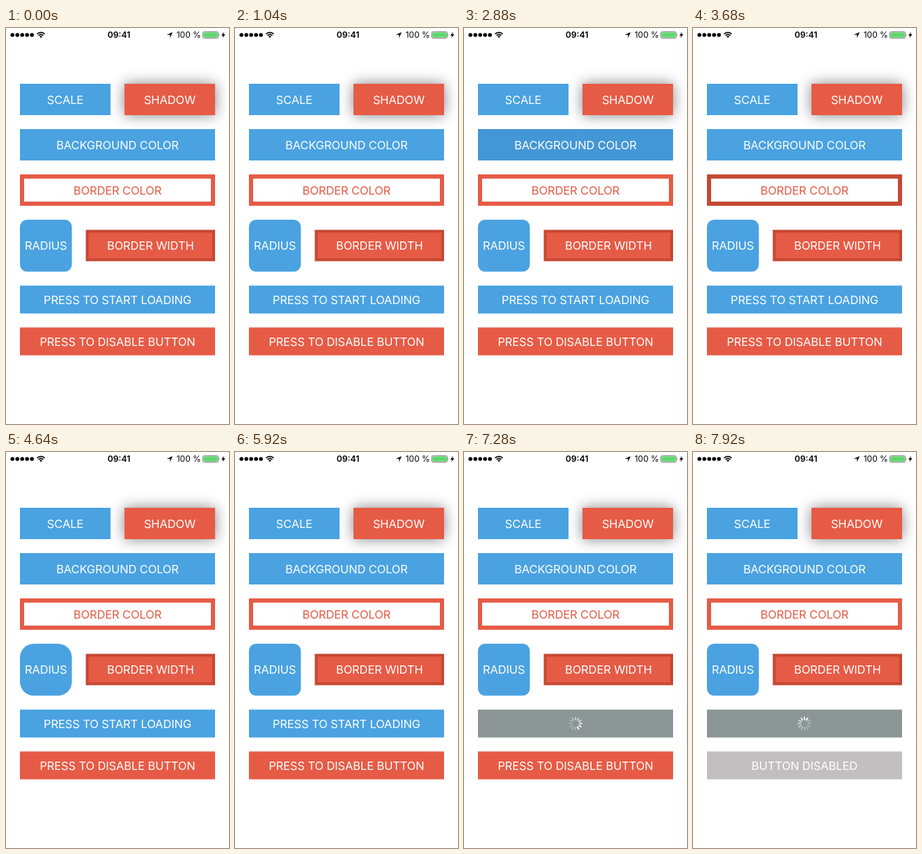
Write an HTML page that moves like this. It is 320 by 568 pixels and loops after 8000 ms.

```html
<!DOCTYPE html>
<html lang="en">
<head>
<meta charset="utf-8">
<title>Button states</title>
<style>
html, body { margin: 0; width: 100%; height: 100%; overflow: hidden; background: #fff; }
svg { display: block; font-family: Inter, "Open Sans", sans-serif; }
.label { font-size: 16.5px; letter-spacing: -.13px; text-anchor: middle; fill: #fff; }
</style>
</head>
<body>
<svg width="320" height="568" font-size="12">
  <path d="M9.2 10h29" stroke="#000" stroke-width="5.6" stroke-linecap="round" stroke-dasharray="0 7"/>
  <g fill="none" stroke="#000" stroke-width="1.7">
    <path d="M44.6 8.6a7.8 7.8 0 0 1 11 0M46.7 10.8a4.8 4.8 0 0 1 6.8 0"/>
  </g>
  <path d="M50.1 14.2l-1.9-1.9a2.7 2.7 0 0 1 3.8 0z"/>
  <text x="162" y="14.3" font-size="12.2" text-anchor="middle" font-weight="600">09:41</text>
  <path d="M239 6l-3.6 8.4v-4.6h-4.7z"/>
  <text x="262.3" y="14.3" text-anchor="middle">100 %</text>
  <rect x="282.5" y="5.5" width="22" height="9" rx="1.8" fill="#fff" stroke="#555" stroke-width=".8"/>
  <rect x="283.5" y="6.5" width="20" height="7" rx=".8" fill="#59d86b"/>
  <path d="M305.7 8.3q1.4 1.7 0 3.4z" fill="#555"/>
  <path d="M313 5.5l-4 5.2h2.5l-1 3.8 4.2-5.4h-2.6z"/>
  <rect id="glow" x="170" y="80" width="130" height="45" fill="#14141e" opacity=".53"/>
  <g id="buttons"></g>
  <g id="spinner" transform="translate(160 389.5)" stroke="#fff" stroke-width="2" stroke-linecap="round"></g>
</svg>
<script>
const LOOP = 8000, SPOKES = 12;
const BLUE = [74, 162, 225], DARK_BLUE = [61, 137, 200];
const RED = [230, 91, 69], DARK_RED = [197, 72, 51];
const GRAY = [139, 149, 150], LIGHT = [193, 195, 198];

const ease = (t, a, b) => {
  const p = Math.min(1, Math.max(0, (t - a) / (b - a)));
  return p * p * (3 - 2 * p);
};
// Rises over a..b, falls over c..d
const press = (t, a, b, c, d) => ease(t, a, b) - ease(t, c, d);
const mix = (a, b, p) => a + (b - a) * p;
const rgb = c => `rgb(${c.map(Math.round)})`;
const blend = (a, b, p) => rgb(a.map((v, i) => mix(v, b[i], p)));

const el = id => document.getElementById(id);
const set = (node, attrs) => {
  for (const key in attrs) node.setAttribute(key, attrs[key]);
};
function add(parent, tag, attrs) {
  const node = document.createElementNS('http://www.w3.org/2000/svg', tag);
  set(node, attrs);
  return parent.appendChild(node);
}

// Drawn around its own centre, so that it can be scaled in place
function button(x, y, w, h, fill, title) {
  const cx = x + w / 2, cy = y + h / 2;
  const group = add(el('buttons'), 'g', {});
  const box = add(group, 'rect', { fill: rgb(fill) });
  const label = add(group, 'text', { class: 'label', y: 6 });
  const self = {
    box, label,
    scale: s => set(group, { transform: `translate(${cx} ${cy}) scale(${s})` }),
    border: b => set(box, {
      x: (b - w) / 2, y: (b - h) / 2, width: w - b, height: h - b, 'stroke-width': b
    }),
    title: text => { if (label.textContent !== text) label.textContent = text; }
  };
  self.scale(1);
  self.border(0);
  self.title(title);
  return self;
}

const scale = button(20, 80, 130, 45, BLUE, 'SCALE');
button(170, 80, 130, 45, RED, 'SHADOW');
const fill = button(20, 145, 280, 45, BLUE, 'BACKGROUND COLOR');
const border = button(20, 210, 280, 45, [255, 255, 255], 'BORDER COLOR');
const radius = button(20, 275, 74.5, 74.5, BLUE, 'RADIUS');
const width = button(114.5, 289.5, 185.5, 45, RED, 'BORDER WIDTH');
const load = button(20, 369.5, 280, 40, BLUE, '');
const disable = button(20, 429.5, 280, 40, RED, '');

border.border(6);
border.label.style.fill = rgb(RED);
set(width.box, { stroke: rgb(DARK_RED) });

const spinner = el('spinner');
for (let i = 0; i < SPOKES; i++)
  add(spinner, 'path', { d: 'M0-5.7V-9', transform: `rotate(${i * 360 / SPOKES})` });

function draw(t) {
  scale.scale(mix(1, .9, press(t, 40, 420, 500, 900)));
  el('glow').style.filter = `blur(${mix(10, 3, press(t, 1000, 1800, 1920, 2560))}px)`;
  set(fill.box, { fill: blend(BLUE, DARK_BLUE, press(t, 2740, 3040, 3140, 3360)) });
  set(border.box, { stroke: blend(RED, DARK_RED, press(t, 3600, 3680, 3780, 4000)) });
  set(radius.box, { rx: mix(10, 20, press(t, 4280, 4600, 4740, 4960)) });
  width.border(mix(4, 8, press(t, 5240, 5520, 5640, 5900)));

  const loading = t >= 6320;
  load.title(loading ? '' : 'PRESS TO START LOADING');
  set(load.box, { fill: blend(BLUE, GRAY, ease(t, 6280, 6600)) });
  spinner.style.display = loading ? '' : 'none';
  const head = Math.floor(t * SPOKES / 1000) + 2;
  [...spinner.children].forEach((spoke, i) => {
    const age = (head - i + SPOKES) % SPOKES;
    set(spoke, { opacity: Math.max(.28, 1 - age * .1) });
  });

  disable.title(t < 7720 ? 'PRESS TO DISABLE BUTTON' : 'BUTTON DISABLED');
  set(disable.box, { fill: blend(RED, LIGHT, ease(t, 7660, 7960)) });
}

function tick() {
  draw(performance.now() % LOOP);
  requestAnimationFrame(tick);
}
tick();
</script>
</body>
</html>
```
